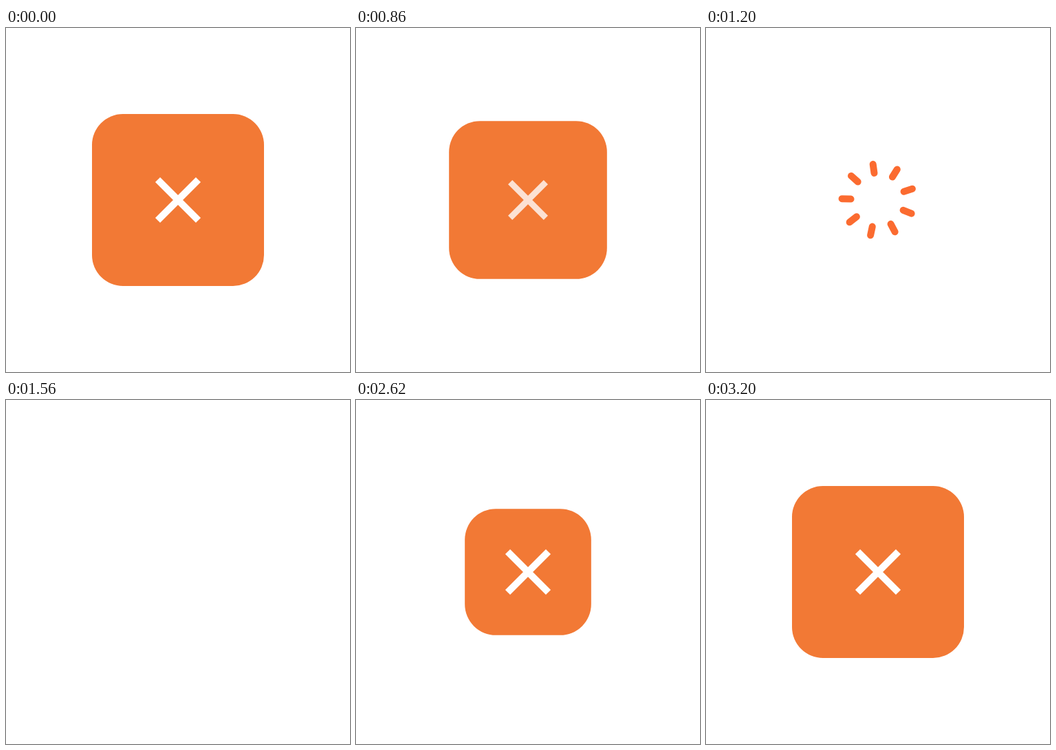
Animation of 500x500 px, one loop 3.6 s. Source, as an HTML page with a canvas:

```html
<!DOCTYPE html>
<html lang="en">
<head>
<meta charset="utf-8">
<title>Close button burst</title>
<style>
  html, body { margin: 0; width: 100%; height: 100%; overflow: hidden; background: #fff; }
  canvas { display: block; }
</style>
</head>
<body>
<canvas id="stage" width="500" height="500"></canvas>
<script>
const ctx = document.getElementById('stage').getContext('2d');
const LOOP = 3600, SIZE = 250, RADIUS = 45;
const ORANGE = '#f27935', SPARK = '#fb6b30';
const BURST = { start: 1100, end: 1560, rays: 9, angle: -8, reach: 63.5 };
// [time, scale] of the springy return
const SPRING = [[2400, 0], [2760, 1.1], [2900, 0.95], [3050, 1.025], [3200, 1]];

const progress = (t, from, to) => Math.min(1, Math.max(0, (t - from) / (to - from)));
const smooth = u => u * u * (3 - 2 * u);
const easeOut = u => 1 - (1 - u) ** 4;

function squareScale(t) {
  if (t < 2400) return 1 - progress(t, 750, 1139) ** 2;
  let scale = 0;
  for (let i = 1; i < SPRING.length; i++) {
    const [from, a] = SPRING[i - 1], [to, b] = SPRING[i];
    if (t >= from) scale = a + (b - a) * smooth(progress(t, from, to));
  }
  return scale;
}

function drawSquare(scale) {
  const size = SIZE * scale;
  ctx.fillStyle = ORANGE;
  ctx.beginPath();
  ctx.roundRect(-size / 2, -size / 2, size, size, Math.min(RADIUS, size / 2));
  ctx.fill();
}

function drawCross(color, scale = 1, alpha = 1, shift = 0) {
  const arm = 29.5;
  ctx.save();
  ctx.translate(shift, shift);
  ctx.scale(scale, scale);
  ctx.globalAlpha = alpha;
  ctx.strokeStyle = color;
  ctx.lineWidth = 10;
  ctx.lineCap = 'butt';
  ctx.beginPath();
  ctx.moveTo(-arm, -arm);
  ctx.lineTo(arm, arm);
  ctx.moveTo(arm, -arm);
  ctx.lineTo(-arm, arm);
  ctx.stroke();
  ctx.restore();
}

function drawBurst(t) {
  const { start, end, rays, angle, reach } = BURST;
  if (t <= start || t >= end) return;
  const outer = reach * easeOut(progress(t, start, start + 285));
  const inner = reach * easeOut(progress(t, start, end + 8));
  ctx.strokeStyle = SPARK;
  ctx.lineCap = 'round';
  ctx.lineWidth = 10 * (1 - progress(t, 1400, end));
  ctx.beginPath();
  for (let i = 0; i < rays; i++) {
    const a = (angle + i * 360 / rays) * Math.PI / 180;
    const x = Math.sin(a), y = -Math.cos(a);
    ctx.moveTo(x * inner, y * inner);
    ctx.lineTo(x * outer, y * outer);
  }
  ctx.stroke();
}

function draw(t) {
  ctx.setTransform(1, 0, 0, 1, 0, 0);
  ctx.fillStyle = '#fff';
  ctx.fillRect(0, 0, 500, 500);
  ctx.translate(250, 250);

  const scale = squareScale(t);
  const returning = t >= 2400;
  if (returning) drawCross(SPARK, 1, 0.7, -0.5);
  if (scale > 0) drawSquare(scale);
  drawBurst(t);
  if (returning) {
    drawCross('#fff');
  } else if (scale > 0) {
    const press = progress(t, 410, 480);
    drawCross('#fff', scale * (1 - 0.045 * press), 1 - 0.22 * press);
  }
}

const origin = performance.now();
function tick() {
  draw((performance.now() - origin) % LOOP);
  requestAnimationFrame(tick);
}
tick();
</script>
</body>
</html>
```
